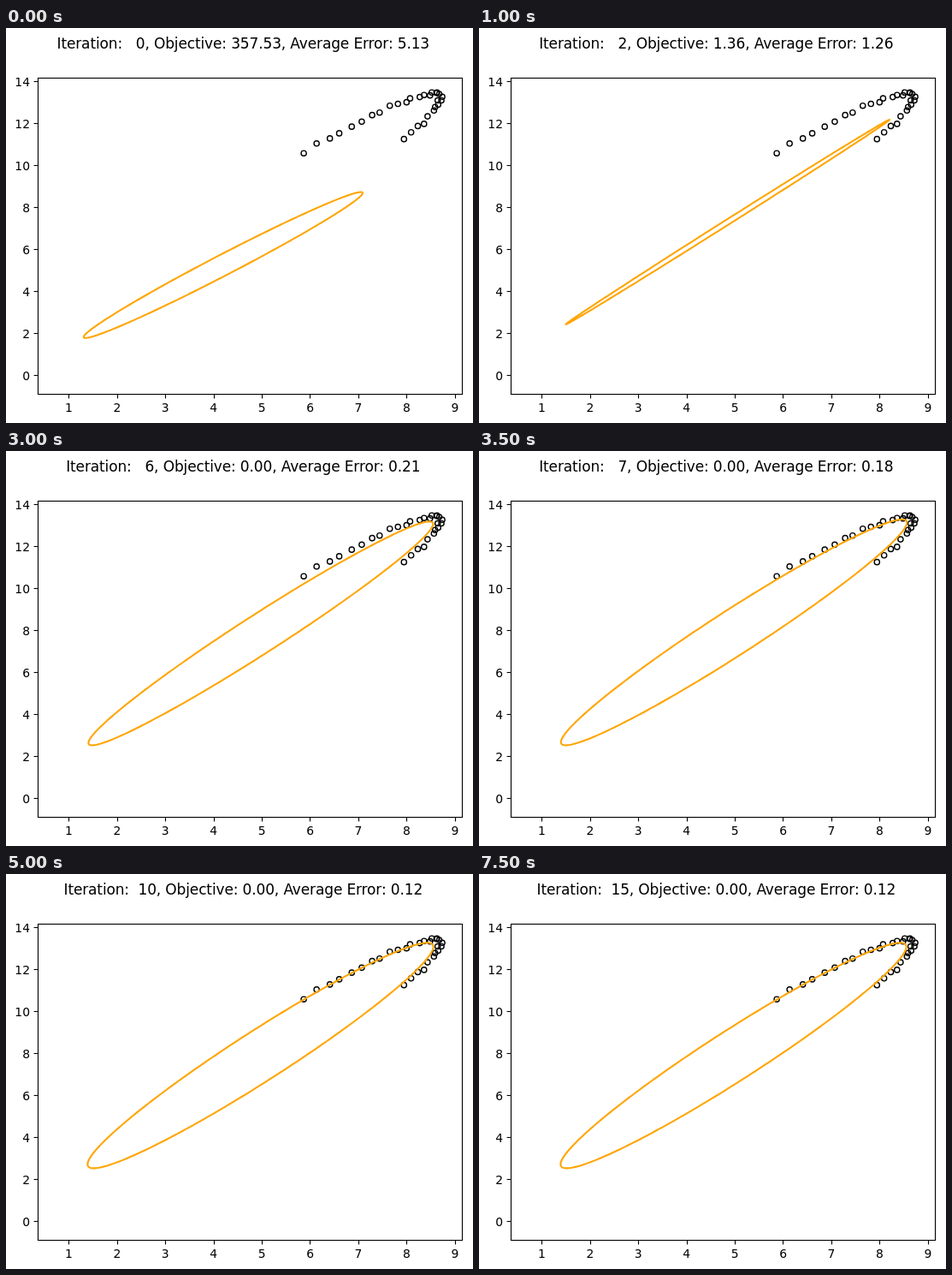
An HTML page for the animation above (8 s loop, 546x461 px).

```html
<!DOCTYPE html>
<html lang="en">
<head>
<meta charset="utf-8">
<title>Ellipse fit</title>
<style>
  html, body { margin: 0; width: 100%; height: 100%; overflow: hidden; background: #fff; }
  svg { display: block; }
  text { font-family: "DejaVu Sans", sans-serif; font-size: 13.889px; white-space: pre; }
  #title { font-size: 17px; letter-spacing: -0.14px; text-anchor: middle; }
  .axes { fill: none; stroke: #000; stroke-width: 1.11; }
  .dots { fill: none; stroke: #000; stroke-width: 1.39; }
  #curve { fill: none; stroke: #ffa500; stroke-width: 2.08; stroke-linejoin: round; }
</style>
</head>
<body>
<svg width="546" height="461" viewBox="0 0 546 461">
  <g class="dots" id="dots"></g>
  <path id="curve"/>
  <g class="axes" id="axes"><rect x="37.5" y="58.5" width="496" height="369"/></g>
  <g id="labels"></g>
  <text id="title" x="277.3" y="24"></text>
</svg>
<script>
const STEP = 500, COUNT = 16, CONVERGED = 10;
const $ = id => document.getElementById(id);

function add(parent, tag, attrs, text) {
  const el = document.createElementNS("http://www.w3.org/2000/svg", tag);
  for (const key in attrs) el.setAttribute(key, attrs[key]);
  if (text !== undefined) el.textContent = text;
  $(parent).appendChild(el);
}

// Axis ticks and labels
const snap = v => Math.floor(v) + 0.5;
for (let v = 1; v <= 9; v++) {
  const x = 17.42 + 56.42 * v;
  add("axes", "path", { d: `M${snap(x)} 427.5v4.9` });
  add("labels", "text", { x: x - 0.4, y: 448, "text-anchor": "middle" }, v);
}
for (let v = 0; v <= 14; v += 2) {
  const y = snap(405.5 - 24.5 * v);
  add("axes", "path", { d: `M37.5 ${y}h-4.9` });
  add("labels", "text", { x: 28, y: y + 5.5, "text-anchor": "end" }, v);
}

// Point at angle t of an ellipse in a box; lag is the phase between x and y
function onEllipse({ left, right, top, bottom, lag }, t) {
  return [
    (left + right) / 2 + (right - left) / 2 * Math.cos(t),
    (top + bottom) / 2 - (bottom - top) / 2 * Math.cos(t - lag)
  ];
}

// Noisy samples along the upper right arc
let seed = 7;
const noise = size => {
  seed = seed * 16807 % 2147483647;
  return (seed / 2147483647 - 0.5) * size;
};
const truth = { left: 92, right: 508, top: 76, bottom: 348, lag: 0.277 };
for (let i = 0; i < 30; i++) {
  const [x, y] = onEllipse(truth, 1.325 - 0.068 * i);
  add("dots", "circle", { cx: x + noise(5), cy: y + noise(5), r: 3.1 });
}

// Falls fast at first, then ever more slowly
const decay = (start, a, b, n) => start * Math.exp(-a * n + b * n * n);
const objective = n => decay(357.53, 3.072, 0.143, n);
const error = n => n < CONVERGED ? 0.13 + decay(5, 0.7745, 0.0155, n) : 0.12;

// Key poses of the fit, eased in between
const poses = [
  { at: 0, left: 90.8, right: 417, top: 191.5, lag: 0.161 },
  { at: 2, left: 101.5, right: 480, top: 107, lag: 0.03 },
  { at: 4, left: 101.3, right: 491, top: 82.3, lag: 0.043 },
  { at: 6, left: 96.4, right: 499.4, top: 82.3, lag: 0.207 },
  { at: 9, left: 95.4, right: 500.9, top: 78, lag: 0.261 },
  { at: CONVERGED, left: 95.4, right: 499.6, top: 80.3, lag: 0.266 }
];

function fit(n) {
  const k = Math.min(n, CONVERGED);
  const next = Math.max(1, poses.findIndex(p => p.at >= k));
  const a = poses[next - 1], b = poses[next];
  const u = 1 - ((b.at - k) / (b.at - a.at)) ** 2;
  const mix = key => a[key] + (b[key] - a[key]) * u;
  return {
    left: mix("left"), right: mix("right"), top: mix("top"), lag: mix("lag"),
    bottom: 343.4 + decay(18.4, 1, 0, k)
  };
}

function ellipsePath(shape) {
  const pts = Array.from({ length: 240 }, (_, i) =>
    onEllipse(shape, i * Math.PI / 120).map(v => v.toFixed(2)).join(" "));
  return `M${pts.join("L")}Z`;
}

let shown = -1;
function draw() {
  const n = Math.floor(performance.now() / STEP) % COUNT;
  if (n !== shown) {
    shown = n;
    $("curve").setAttribute("d", ellipsePath(fit(n)));
    $("title").textContent = `Iteration: ${String(n).padStart(3)}, ` +
      `Objective: ${objective(n).toFixed(2)}, Average Error: ${error(n).toFixed(2)}`;
  }
  requestAnimationFrame(draw);
}
draw();
</script>
</body>
</html>
```
